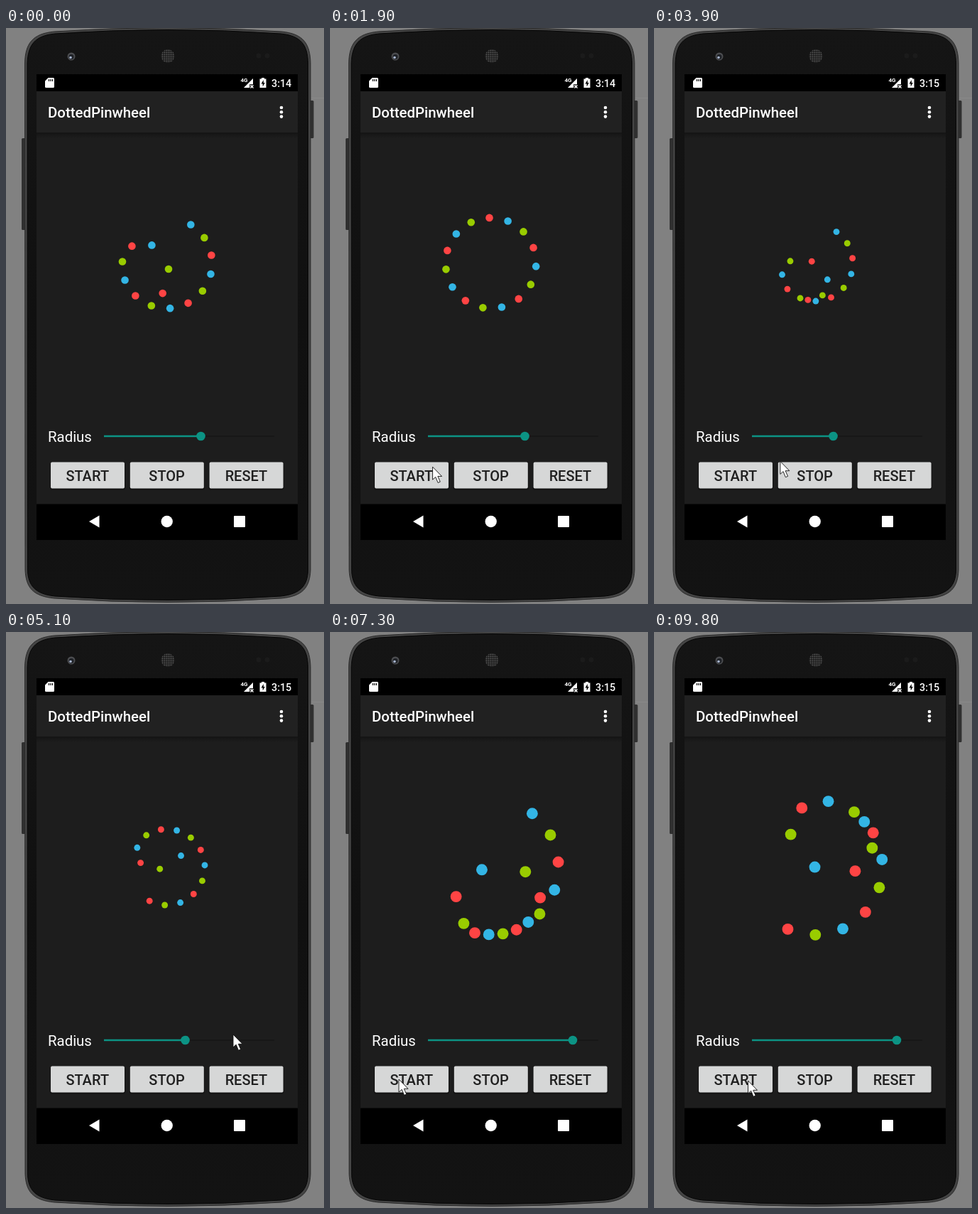
An HTML page for the animation above (10 s loop, 448 by 810 pixels).

```html
<!DOCTYPE html>
<html lang="en">
<head>
<meta charset="utf-8">
<title>Dot spinner</title>
<style>
html, body { margin: 0; width: 100%; height: 100%; overflow: hidden; background: #818181; }
svg { display: block; width: 448px; height: 810px; }
text { font-family: Roboto, Arial, sans-serif; fill: #fff; }
.label { font-size: 20px; font-weight: 500; fill: #202020; text-anchor: middle; }
.key { fill: #d6d7d7; }
.white { fill: #fff; }
</style>
</head>
<body>
<svg viewBox="0 0 448 810">
  <defs>
    <linearGradient id="fade" x2="0" y2="1">
      <stop stop-color="#141414"/><stop offset="1" stop-color="#1d1d1d"/>
    </linearGradient>
    <linearGradient id="shell" x2="0" y2="1">
      <stop stop-color="#151515"/><stop offset=".5" stop-color="#101010"/><stop offset="1" stop-color="#131313"/>
    </linearGradient>
    <pattern id="mesh" width="3" height="3" patternUnits="userSpaceOnUse">
      <rect width="3" height="3" fill="#1c1c1c"/><circle cx="1.5" cy="1.5" r="1" fill="#555"/>
    </pattern>
  </defs>

  <rect width="448" height="810" fill="#818181"/>
  <path d="M430 98.500H448" stroke="#898989"/>
  <rect x="22" y="155" width="7" height="129" rx="1.500" fill="#303030"/>
  <rect x="427" y="102" width="6.500" height="53" rx="1.500" fill="#303030"/>
  <path d="M26.500 50C27 22 37 8 68 5Q228 -6 388 5C419 8 428.500 22 429 50V762C428 787 418 799 388 802Q228 813 68 802C38 799 28 787 27 762Z" fill="#444" stroke="#2a2a2a"/>
  <path d="M30 50C31 24 40 11 69 8Q228 -3 387 8C416 11 425 24 425.500 50V762C425 784 415 796 387 799Q228 810 69 799C41 796 31 784 30.500 762Z" fill="url(#shell)" stroke="#060606"/>

  <circle cx="92" cy="40" r="5.500" fill="#4c4d50"/>
  <circle cx="92" cy="40.500" r="3.500" fill="#1e2126"/>
  <circle cx="91" cy="41.500" r="1.800" fill="#a6b3cc"/>
  <circle cx="228" cy="39.500" r="9.500" fill="url(#mesh)"/>
  <circle cx="356" cy="39" r="3.500" fill="#1b1b1b"/>
  <circle cx="368" cy="39" r="3.500" fill="#1b1b1b"/>

  <rect x="43" y="65" width="368" height="655"/>
  <rect x="43" y="89" width="368" height="58" fill="#212121"/>
  <rect x="43" y="147" width="368" height="522.500" fill="#1d1d1d"/>
  <rect x="43" y="147" width="368" height="8" fill="url(#fade)"/>

  <path class="white" d="M59.500 70H66.500Q68 70 68 71.500V82.500Q68 84 66.500 84H56.500Q55 84 55 82.500V74.500Z"/>
  <path d="M60.500 72v3M63 72v3M65.500 72v3" stroke="#000" stroke-width="1.200"/>
  <text x="330.500" y="76" font-size="8" font-weight="700">4G</text>
  <path class="white" d="M335 84L348 71V79H343V84Z"/>
  <path d="M348 71V84H335Z" fill="#fff" opacity=".25"/>
  <path d="M344.500 80.500l4 4m0-4l-4 4" stroke="#fff" stroke-width="1.200"/>
  <path class="white" d="M360 70h4v1.500h2.500V84H357.500V71.500H360Z"/>
  <path d="M362.800 73L359.500 78.500H361.700V82.500L364.800 77H362.800Z"/>
  <text id="clock" x="374" y="83" font-size="14.300" font-weight="500">3:14</text>

  <text x="59" y="126" font-size="20.400" font-weight="500">DottedPinwheel</text>
  <g class="white">
    <circle cx="388" cy="112" r="2.300"/><circle cx="388" cy="118.300" r="2.300"/><circle cx="388" cy="124.600" r="2.300"/>
  </g>

  <g id="dots"></g>

  <text x="59" y="582" font-size="20.400">Radius</text>
  <path d="M138 574H378" stroke="#171717" stroke-width="2"/>
  <path id="bar" stroke="#0c9384" stroke-width="2.500"/>
  <circle id="thumb" cy="574" r="6.300" fill="#0c9384"/>

  <g id="keys"></g>

  <g class="white">
    <path d="M117 694L131.500 685.500V702.500Z"/>
    <circle cx="226.700" cy="694" r="8.200"/>
    <rect x="321" y="686" width="16" height="16" rx="1"/>
  </g>
  <path id="cursor" d="M0 0V18L4.200 14.300L7.500 22.300L10.700 21L7.300 13.300H13Z" fill="#fff" stroke="#111" stroke-width=".9"/>
</svg>
<script>
const $ = id => document.getElementById(id);
const clamp = (v, lo, hi) => Math.min(hi, Math.max(lo, v));
function set(el, attrs) {
  for (const k in attrs) el.setAttribute(k, attrs[k]);
}
function add(parent, tag, attrs) {
  const el = document.createElementNS('http://www.w3.org/2000/svg', tag);
  set(el, attrs);
  return parent.appendChild(el);
}

const LOOP = 10000, STEP = 100;
const COUNT = 15, GAP = 360 / COUNT;
const COLORS = ['#ff4444', '#99cc00', '#33b5e5'];
const CX = 226.6, CY = 330.6;

// Spinner time is counted in lags: the delay from one dot to the next.
const LAG = 115.6, SWING = 7.6, CYCLE = COUNT + SWING;
const STARTS = [-576, 2417, 3128, 6025, 6304, 7589], STOP = 9300;

// Key points: time, then values.
const SLIDER = [[2300, 274.5], [2900, 177.8], [3130, 252.5], [5650, 252.5], [6300, 315.5], [6600, 317], [6700, 342]];
const POINTER = [[1500, -20, 672], [2200, 268, 576], [2800, 168, 581], [3250, 248, 578], [3800, 166, 613],
  [5100, 320, 566], [5500, 340, 578], [6600, 340, 579], [7300, 97, 629], [8000, 104, 645],
  [8800, 200, 622], [9300, 318, 620], [9500, 318, 620], [9800, 132.5, 631]];

function track(rows, t) {
  const i = clamp(rows.findIndex(row => row[0] > t), 1, rows.length - 1);
  const n = t >= rows.at(-1)[0] ? rows.length - 1 : i;
  const a = rows[n - 1], b = rows[n];
  const k = clamp((t - a[0]) / (b[0] - a[0]), 0, 1);
  return a.slice(1).map((v, j) => v + (b[j + 1] - v) * k);
}

const easeInOutCubic = p => p < .5 ? 4 * p ** 3 : 1 - 4 * (1 - p) ** 3;

function spinPhase(t) {
  const now = Math.min(t, STOP);
  const start = STARTS.findLast(s => s <= now);
  return (now - start) / LAG % CYCLE;
}

const dots = Array.from({ length: COUNT }, (_, i) => add($('dots'), 'circle', { fill: COLORS[i % 3] }));
const keys = ['START', 'STOP', 'RESET'].map((name, i) => {
  const x = 63 + 111.8 * i;
  add($('keys'), 'rect', { x: x - 1, y: 611, width: 106, height: 39, rx: 3, fill: '#121212', opacity: .7 });
  const face = add($('keys'), 'rect', { x, y: 610.5, width: 104, height: 37, rx: 2, class: 'key' });
  add($('keys'), 'text', { x: x + 51.8, y: 636.5, class: 'label' }).textContent = name;
  return face;
});

function draw(t) {
  const phase = spinPhase(t);
  const [knob] = track(SLIDER, t);
  const [px, py] = track(POINTER, t);
  const radius = (knob - 138) * .467;

  // Dots swing through the centre one after another while the ring turns.
  dots.forEach((dot, i) => {
    const p = clamp((phase - i) / SWING, 0, 1);
    const r = radius * (1 - 2 * easeInOutCubic(p));
    const a = (270 + 1.5 * GAP * phase / CYCLE - GAP * i) * Math.PI / 180;
    set(dot, { cx: CX + r * Math.cos(a), cy: CY + r * Math.sin(a), r: radius / 12 });
  });

  set($('bar'), { d: `M138 574H${knob}` });
  set($('thumb'), { cx: knob });
  set($('cursor'), { transform: `translate(${px} ${py})` });
  $('clock').textContent = t < 3900 ? '3:14' : '3:15';
  keys[0].style.fill = t >= 7800 && t < 8100 ? '#bcbdbd' : '';
}

const start = performance.now();
function tick() {
  const t = (performance.now() - start) % LOOP;
  draw(Math.floor(t / STEP) * STEP);
  requestAnimationFrame(tick);
}
tick();
</script>
</body>
</html>
```
